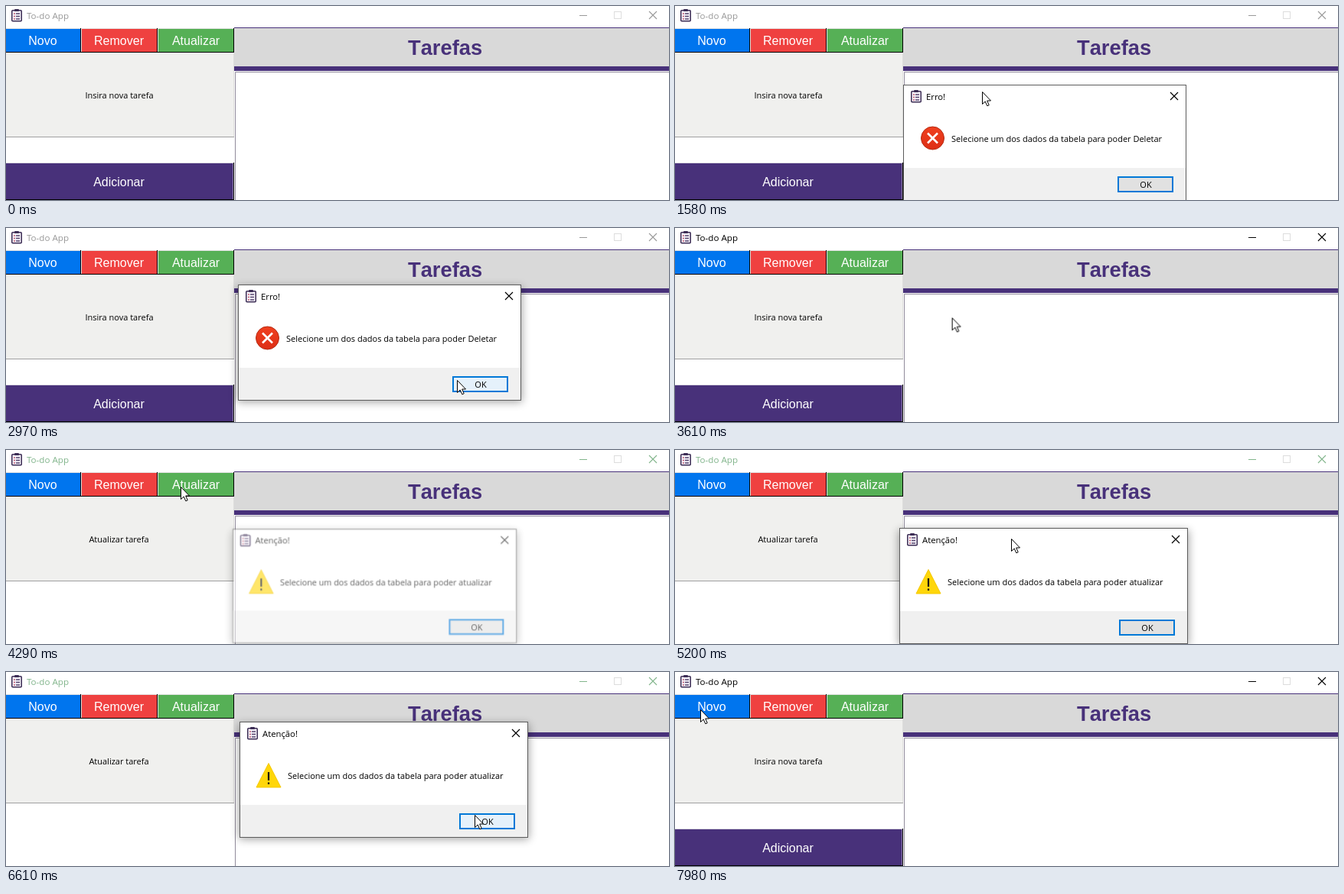
These frames come from a looping animation (866 px wide and 254 px high, 8000 ms). An HTML page:

```html
<!DOCTYPE html>
<html lang="pt">
<head>
<meta charset="utf-8">
<title>To-do App</title>
<style>
  html, body { margin: 0; width: 100%; height: 100%; overflow: hidden; background: #fff; }
  svg { display: block; width: 866px; height: 254px; }
  text { font: 11px "Open Sans", sans-serif; fill: #000; }
  .mid { text-anchor: middle; }
  .btn { font: 16px "Liberation Sans", Arial, sans-serif; fill: #fff; text-anchor: middle; }
  .heading { font: bold 27.3px "Liberation Sans", Arial, sans-serif; font-kerning: none; fill: #48317a; }
  .app-name { font-size: 11.6px; fill: currentColor; }
  .dialog-name { font-size: 11.3px; }

  .loop { animation: 8s linear infinite; }
  .chrome { animation-name: chrome; animation-timing-function: step-end; }
  .insert { animation-name: insert; animation-timing-function: step-end; }
  .update { animation-name: update; animation-timing-function: step-end; }
  .error { animation-name: error; transform-origin: 185px 76px; }
  .warning { animation-name: warning; transform-origin: 188.5px 76px; }
  .shadow { filter: blur(6px); opacity: .36; }
  .error .shadow { animation-name: lift; animation-timing-function: step-end; }
  .hover { opacity: 0; }
  .error .hover { animation-name: hoverError; }
  .warning .hover { animation-name: hoverWarning; }
  .cursor { animation-name: cursor; animation-timing-function: ease-in-out; }
  .blink { animation-name: blink; animation-timing-function: step-end; }

  @keyframes chrome {
    0% { color: #999; }
    37.6% { color: #000; }
    51.5% { color: #82b58c; }
    90.5%, 100% { color: #000; }
  }
  @keyframes insert { 0%, 98% { opacity: 1; } 51% { opacity: 0; } }
  @keyframes update { 0%, 98% { opacity: 0; } 51% { opacity: 1; } }
  @keyframes blink { 0% { opacity: 0; } 3%, 100% { opacity: 1; } }
  @keyframes lift { 0% { opacity: 0; } 24%, 100% { opacity: .36; } }
  @keyframes hoverError { 0%, 33.2% { opacity: 0; } 35%, 100% { opacity: 1; } }
  @keyframes hoverWarning { 0%, 80.6% { opacity: 0; } 82.4%, 100% { opacity: 1; } }
  @keyframes error {
    0%, 3% { transform: translate(298px, 103px) scale(.96); opacity: 0; }
    5.8%, 24% { transform: translate(298px, 103px); opacity: 1; }
    29.25%, 37.6% { transform: translate(303px, 74px); opacity: 1; }
    40%, 100% { transform: translate(303px, 74px) scale(.95); opacity: 0; }
  }
  @keyframes warning {
    0%, 51.5% { transform: translate(293px, 102px) scale(.96); opacity: 0; }
    55%, 66.875% { transform: translate(293px, 102px); opacity: 1; }
    73.75%, 90.25% { transform: translate(305px, 65px); opacity: 1; }
    92.5%, 100% { transform: translate(305px, 65px) scale(.95); opacity: 0; }
  }
  @keyframes cursor {
    0%, 13.6% { transform: translate(128px, 39px); }
    19.6% { transform: translate(401px, 112px); }
    24% { transform: translate(401px, 112px); animation-timing-function: linear; }
    29.25%, 30% { transform: translate(406px, 83px); }
    33.6%, 39% { transform: translate(589px, 199px); }
    44.25%, 45% { transform: translate(363px, 118px); }
    46.9%, 55.6% { transform: translate(228px, 48px); }
    60.6%, 61.5% { transform: translate(420px, 125px); }
    65% { transform: translate(439px, 116px); }
    66.875% { transform: translate(439px, 116px); animation-timing-function: linear; }
    73.75%, 74.2% { transform: translate(451px, 79px); }
    76.5%, 77.4% { transform: translate(565px, 145px); }
    82.4%, 90.6% { transform: translate(612px, 187px); }
    94.75%, 100% { transform: translate(33px, 49px); }
  }
</style>
</head>
<body>
<svg viewBox="0 0 866 254">
  <defs>
    <g id="clipboard">
      <rect x=".75" y="1.75" width="12.5" height="14" rx="1" fill="#f4f1f8" stroke="#3c2d55" stroke-width="1.5"/>
      <rect x="4" width="6" height="3" rx="1" fill="#3c2d55"/>
      <path d="M3 6h2M3 9.5h2M3 13h2" stroke="#c05a70" stroke-width="1.6"/>
      <path d="M6 6h5M6 9.5h5M6 13h5" stroke="#54446e" stroke-width="1.3"/>
    </g>
    <path id="cross" d="M-5-5L5 5M5-5L-5 5" fill="none"/>
    <g id="ok">
      <rect x="1" y="1" width="71" height="19" fill="#e1e1e1" stroke="#0078d7" stroke-width="2"/>
      <g class="hover loop">
        <rect x="1" y="1" width="71" height="19" fill="#e5f1fb" stroke="#0078d7" stroke-width="1.6"/>
      </g>
    </g>
    <linearGradient id="red" x2="0" y2="1">
      <stop stop-color="#f0401f"/><stop offset="1" stop-color="#dd2f16"/>
    </linearGradient>
  </defs>

  <rect width="866" height="254" fill="#fff"/>

  <!-- Title bar -->
  <use href="#clipboard" x="7" y="4"/>
  <g class="chrome loop">
    <text class="app-name" x="27" y="17">To-do App</text>
    <path d="M749 12.5h10" stroke="currentColor"/>
    <use href="#cross" x="845" y="12" stroke="currentColor" stroke-width="1.1"/>
  </g>
  <rect x="794.5" y="7.5" width="9" height="9" fill="none" stroke="#ddd"/>

  <!-- Task list -->
  <rect x="298" y="28" width="568" height="57" fill="#48317a"/>
  <rect x="298" y="29" width="568" height="50" fill="#d9d9d9"/>
  <text class="heading" x="525" y="64">Tarefas</text>
  <path d="M299.5 254V86.5H866" fill="none" stroke="#918b9b"/>

  <!-- Side panel -->
  <rect y="61" width="298" height="111" fill="#f0f0ee"/>
  <path d="M0 171.5H298" stroke="#a0a0a0"/>
  <path d="M297.5 61V171" stroke="#dededc"/>
  <g>
    <path d="M0 29H298V61H0z" fill="#000"/>
    <path d="M0 29H97V60H0zM98 29H197V60H98zM198 29H297V60H198z" fill="#e3e3e3"/>
    <path d="M0 30H97V60H0z" fill="#0075ee"/>
    <path d="M99 30H197V60H99z" fill="#ef4140"/>
    <path d="M199 30H297V60H199z" fill="#56b056"/>
    <text class="btn" x="48" y="51">Novo</text>
    <text class="btn" x="147.5" y="51">Remover</text>
    <text class="btn" x="248" y="51">Atualizar</text>
  </g>
  <g class="insert loop">
    <text class="mid" x="148" y="121">Insira nova tarefa</text>
    <path d="M0 205H298V254H0z" fill="#000"/>
    <path d="M0 205H297V253H0z" fill="#d8d5df"/>
    <path d="M0 206H296.5V253H0z" fill="#48317a"/>
    <text class="btn" x="147.5" y="236">Adicionar</text>
  </g>
  <text class="update loop mid" x="147.5" y="121">Atualizar tarefa</text>

  <!-- Dialogs -->
  <g class="error loop">
    <rect class="shadow loop" x="-1" y="3" width="372" height="151"/>
    <rect x=".5" y=".5" width="369" height="151" fill="#fff" stroke="#5c5c5c"/>
    <rect x="1" y="109" width="368" height="42" fill="#f0f0f0"/>
    <use href="#clipboard" x="10" y="7"/>
    <text class="dialog-name" x="30" y="20">Erro!</text>
    <use href="#cross" x="354" y="15" stroke="#000" stroke-width="1.2"/>
    <circle cx="38.5" cy="70" r="15" fill="url(#red)" stroke="#b52a12"/>
    <path d="M32 63.5l13 13M45 63.5l-13 13" stroke="#fff" stroke-width="2.6"/>
    <text x="63" y="75">Selecione um dos dados da tabela para poder Deletar</text>
    <g transform="translate(280 120)">
      <rect x="1" y="1" width="71" height="19" fill="#e1e1e1" stroke="#0078d7" stroke-width="2"/>
      <rect class="hover loop" x="1" y="1" width="71" height="19" fill="#e5f1fb" stroke="#0078d7" stroke-width="2"/>
      <text class="mid" x="37" y="15">OK</text>
    </g>
  </g>
  <g class="warning loop">
    <rect class="shadow" x="-1" y="3" width="379" height="151"/>
    <rect x=".5" y=".5" width="376" height="151" fill="#fff" stroke="#5c5c5c"/>
    <rect x="1" y="109" width="375" height="42" fill="#f0f0f0"/>
    <use href="#clipboard" x="10" y="7"/>
    <text class="dialog-name" x="30" y="20">Atenção!</text>
    <use href="#cross" x="361" y="15" stroke="#000" stroke-width="1.2"/>
    <path d="M38 54.5L54 86H22z" fill="#ffd60a" stroke="#f5c800" stroke-linejoin="round"/>
    <path d="M38 66v11M38 79.5v2.5" stroke="#111" stroke-width="2.2"/>
    <text x="63" y="75">Selecione um dos dados da tabela para poder atualizar</text>
    <g transform="translate(287 120)">
      <rect x="1" y="1" width="71" height="19" fill="#e1e1e1" stroke="#0078d7" stroke-width="2"/>
      <rect class="hover loop" x="1" y="1" width="71" height="19" fill="#e5f1fb" stroke="#0078d7" stroke-width="2"/>
      <text class="mid" x="37" y="15">OK</text>
    </g>
  </g>

  <g class="cursor loop">
    <path class="blink loop" d="M.5.5V16.5L4.2 13 6.8 18.8 9.2 17.8 6.7 12H11.5z" fill="#fff" stroke="#000"/>
  </g>
</svg>
</body>
</html>
```
